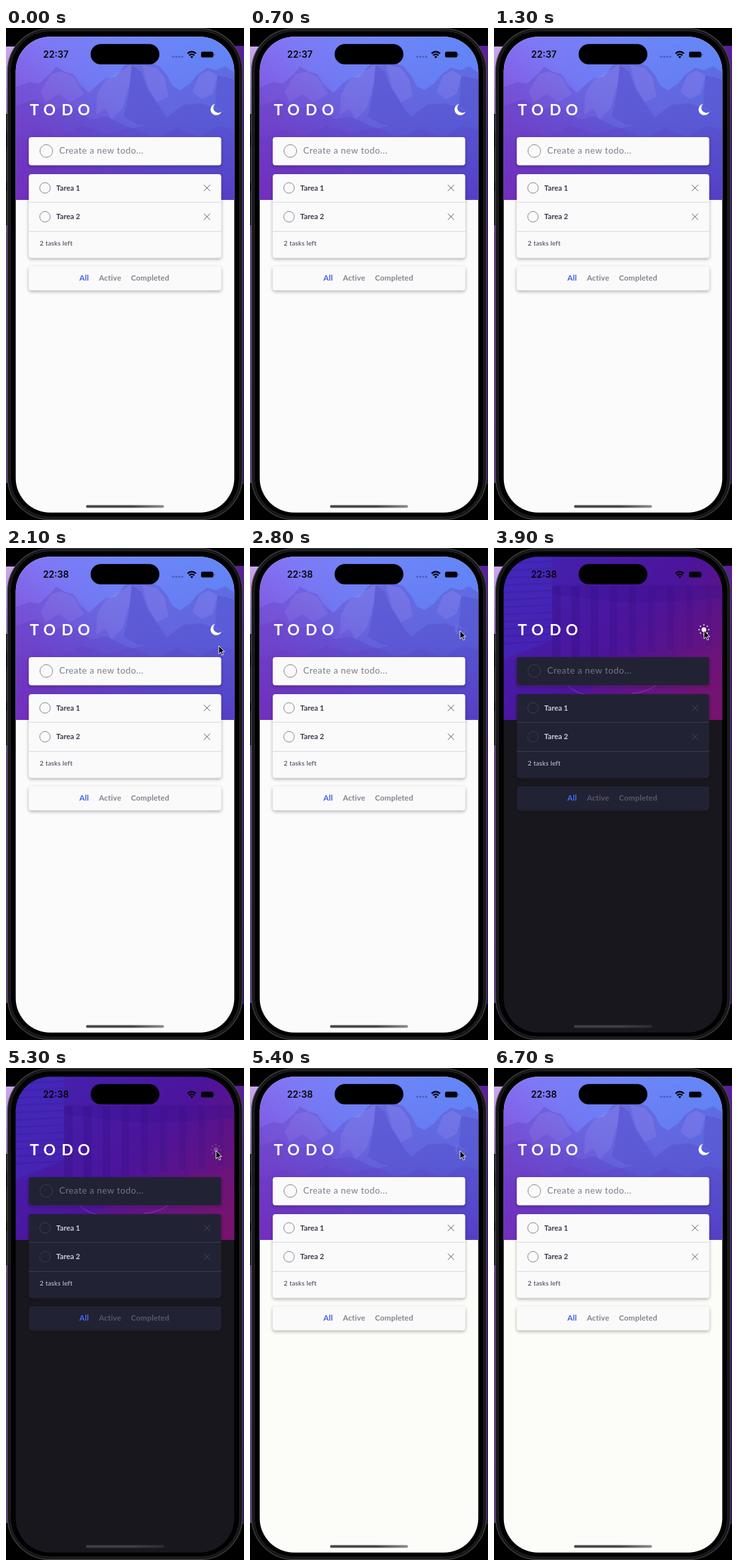
An HTML page for the animation above (8200 ms loop, 360 by 744 pixels).

```html
<!DOCTYPE html>
<html lang="en">
<head>
<meta charset="utf-8">
<title>Todo</title>
<style>
html, body { margin: 0; width: 100%; height: 100%; overflow: hidden; background: #000; }
svg { display: block; width: 100vw; height: 100vh; }
text { font-family: Lato, sans-serif; fill: var(--text); }
#app {
  --card: #fafafb; --text: #393a4f; --soft: #7c7d8a; --line: #d9d9de; --ring: #85868e;
  --cross: #5b5c66; --accent: #3d62dc; --tab: #84858f; --bar: #48484b; --barEnd: #8d8d90;
}
#app.dark {
  --card: #232136; --text: #cbcce2; --soft: #73758c; --line: #3a394e; --ring: #3c3b51;
  --cross: #454459; --accent: #3e70f2; --tab: #56566e; --bar: #3f3f47; --barEnd: #2c2c33;
}
.card { fill: var(--card); }
.line { stroke: var(--line); }
.ring { fill: none; stroke: var(--ring); }
.cross { fill: none; stroke: var(--cross); }
.tab { font-size: 11.7px; font-weight: 700; letter-spacing: .1px; fill: var(--tab); }
</style>
</head>
<body>
<svg viewBox="0 0 360 744" preserveAspectRatio="none">
  <defs>
    <clipPath id="screen"><rect x="14.7" y="13.3" width="330.6" height="719.4" rx="52"/></clipPath>
    <clipPath id="head"><rect x="14" y="13" width="332" height="247"/></clipPath>
    <linearGradient id="sky" x1="0" y1="0" x2="1" y2="0">
      <stop offset="0" stop-color="#8574f5"/><stop offset=".45" stop-color="#7184f8"/><stop offset="1" stop-color="#6288f8"/>
    </linearGradient>
    <linearGradient id="dusk" x1="0" y1="0" x2="0" y2="1">
      <stop offset="0" stop-color="#5b3ccc" stop-opacity="0"/><stop offset=".5" stop-color="#553cc8" stop-opacity=".2"/>
      <stop offset="1" stop-color="#5434bf" stop-opacity=".72"/>
    </linearGradient>
    <linearGradient id="warm" x1="0" y1="1" x2=".55" y2=".5">
      <stop offset="0" stop-color="#8424b8" stop-opacity=".6"/><stop offset="1" stop-color="#8424b8" stop-opacity="0"/>
    </linearGradient>
    <linearGradient id="night" x1="0" y1=".2" x2="1" y2=".9">
      <stop offset="0" stop-color="#4322b0"/><stop offset=".5" stop-color="#4c149b"/><stop offset="1" stop-color="#74136c"/>
    </linearGradient>
    <linearGradient id="leftEdge" x1="0" y1="0" x2="0" y2="1">
      <stop offset="0" stop-color="#cda6f0"/><stop offset=".12" stop-color="#a57cc9"/>
      <stop offset=".4" stop-color="#6a4585"/><stop offset="1" stop-color="#654181"/>
    </linearGradient>
    <linearGradient id="rightEdge" x1="0" y1="0" x2="0" y2="1">
      <stop offset="0" stop-color="#5b1f9c"/><stop offset=".2" stop-color="#40156f"/><stop offset="1" stop-color="#34105c"/>
    </linearGradient>
    <filter id="shadow" x="-10%" y="-20%" width="120%" height="150%">
      <feDropShadow dx="0" dy="2" stdDeviation="2.5" flood-color="#222" flood-opacity=".35"/>
    </filter>
  </defs>

  <rect width="360" height="744"/>
  <path fill="url(#leftEdge)" d="M0 28H30V688H0Z"/>
  <path fill="url(#rightEdge)" d="M330 27H360V690H330Z"/>
  <path fill="#09090b" d="M0 130H4V298H0Z"/>
  <path fill="#1b1b1e" d="M0 131H2V158H0ZM0 180H2V233H0ZM0 246H2V297H0Z"/>
  <rect x="2.5" y=".8" width="355" height="742.5" rx="64" fill="#161618" stroke="#47484b" stroke-width="1.2"/>
  <rect x="6.5" y="4.5" width="347" height="735" rx="60" fill="#000" stroke="#262729"/>

  <g id="app">
    <linearGradient id="bar">
      <stop offset="0" style="stop-color:var(--bar)"/><stop offset=".6" style="stop-color:var(--bar)"/>
      <stop offset="1" style="stop-color:var(--barEnd)"/>
    </linearGradient>
    <g clip-path="url(#screen)">
      <rect id="page" x="14" y="13" width="332" height="720"/>
      <g id="day" clip-path="url(#head)">
        <rect x="14" y="13" width="332" height="247" fill="url(#sky)"/>
        <path fill="#5b45c0" opacity=".36" d="M14 90L34 82 50 84 66 70 76 58 88 66 102 70 112 86 126 98 140 84 152 76 166 74 178 58 190 49 204 53 218 52 232 58 244 72 252 88 264 94 278 84 290 70 304 60 318 64 332 58 346 68V260H14Z"/>
        <g fill="#aaa0f4" opacity=".24">
          <path d="M68 70L84 66 102 73 118 100 96 112 80 100 60 112 52 96Z"/>
          <path d="M150 79L178 62 190 55 188 82 176 122 160 138 150 122 136 132 138 100Z"/>
          <path d="M206 56L228 60 240 76 246 104 228 112 214 88Z"/>
          <path d="M292 72L306 64 320 72 312 100 296 108 282 96Z"/>
        </g>
        <g fill="#4432ae" opacity=".22">
          <path d="M190 56L204 66 214 92 230 116 244 136 226 150 200 146 178 134 186 98Z"/>
          <path d="M14 118L44 108 70 124 96 116 128 138 152 134 190 152 232 144 268 116 296 114 346 132V260H14Z"/>
          <path d="M320 72L346 78V134L316 118Z"/>
        </g>
        <path fill="#4a36b4" opacity=".16" d="M14 168L52 154 82 164 116 148 154 160 188 150 226 166 258 152 294 165 322 148 346 154V260H14Z"/>
        <rect x="14" y="13" width="332" height="247" fill="url(#dusk)"/>
        <rect x="14" y="13" width="332" height="247" fill="url(#warm)"/>
      </g>
      <g id="nightScene" clip-path="url(#head)">
        <rect x="14" y="13" width="332" height="247" fill="url(#night)"/>
        <path fill="#4531c6" opacity=".4" d="M14 13H88V140L14 168Z"/>
        <path fill="#300c80" opacity=".2" d="M88 56H346V76L210 84 88 70Z"/>
        <g id="columns" fill="#2b0c78"></g>
        <path fill="#8c1679" opacity=".16" d="M90 260L190 178 346 150V260Z"/>
        <path fill="none" stroke="#9b5cae" opacity=".6" d="M111 207Q122 219 137 221M208 220Q232 218 246 207"/>
      </g>

      <text x="36 56.5 84 108.5" y="132" style="font-size:23px;font-weight:700;fill:#fff">TODO</text>

      <g filter="url(#shadow)">
        <rect class="card" x="34.5" y="165" width="291" height="42.5" rx="4"/>
        <rect class="card" x="34.5" y="221" width="291" height="126.5" rx="4"/>
        <rect class="card" x="34.5" y="360.5" width="291" height="36" rx="4"/>
      </g>
      <circle class="ring" cx="61" cy="186" r="9.6"/>
      <text x="80.5" y="190" style="font-size:13.4px;fill:var(--soft);letter-spacing:.5px">Create a new todo...</text>
      <g id="rows"></g>
      <path class="line" d="M34.5 263.5H325.5M34.5 307.5H325.5"/>
      <text x="51" y="328.5" style="font-size:10px;letter-spacing:.15px">2 tasks left</text>
      <text class="tab" x="111" y="382" style="fill:var(--accent)">All</text>
      <text class="tab" x="140.5" y="382">Active</text>
      <text class="tab" x="189" y="382">Completed</text>
      <rect x="121" y="721.5" width="118" height="4" rx="2" fill="url(#bar)"/>
    </g>

    <rect x="128" y="24.3" width="104" height="30.8" rx="15.4"/>
    <text id="clock" x="75.5" y="45" text-anchor="middle" style="font:600 13.8px Inter,sans-serif;fill:#050508"></text>
    <g id="dots" fill="#303a88" opacity=".55">
      <circle cx="253" cy="43.5" r="1.5"/><circle cx="257.5" cy="43.5" r="1.5"/>
      <circle cx="262" cy="43.5" r="1.5"/><circle cx="266.5" cy="43.5" r="1.5"/>
    </g>
    <g fill="none" stroke="#050508" stroke-width="2.3">
      <path d="M274.6 38.6Q281 32.8 287.4 38.6M277 41.5Q281 38 285 41.5"/>
      <path fill="#050508" stroke="none" d="M278.6 43.3Q281 41.5 283.4 43.3L281 45.9Z"/>
    </g>
    <rect x="295" y="35.8" width="18.6" height="8.8" rx="2.7" fill="#050508"/>
    <path d="M314.7 38.5Q316.4 40.2 314.7 41.9Z" fill="#050508"/>

    <g id="icon" fill="#fff">
      <path id="moon" d="M316.3 114.8A8.6 8.6 0 1 0 326 126.4A7.5 7.5 0 0 1 316.3 114.8Z"/>
      <g id="sun"><circle cx="317.5" cy="123.5" r="3.5"/><g id="rays"></g></g>
    </g>
  </g>
  <path id="cursor" d="M0 0V12.2L2.9 9.6 4.9 14.2 7 13.3 5 8.8H8.7Z" fill="#000" stroke="#fff" stroke-width=".9" stroke-linejoin="round"/>
</svg>
<script>
const LOOP = 8200, STEP = 100;
const get = id => document.getElementById(id);
const show = (id, on) => get(id).setAttribute('display', on ? 'inline' : 'none');
const clamp = v => Math.max(0, Math.min(1, v));
const mix = (a, b, k) => a + (b - a) * k;

get('rows').innerHTML = [241.8, 285.4].map((y, i) => `
  <circle class="ring" cx="59" cy="${y}" r="8"/>
  <text x="76" y="${y + 3.7}" style="font-size:11.2px;font-weight:700">Tarea ${i + 1}</text>
  <path class="cross" d="M299.3 ${y - 4.7}l9.4 9.4m0-9.4l-9.4 9.4"/>`).join('');

get('rays').innerHTML = Array.from({ length: 8 }, (_, i) =>
  `<circle cx="317.5" cy="116.2" r="1" transform="rotate(${i * 45} 317.5 123.5)"/>`).join('');

// Receding colonnade
let posts = '';
for (let i = 0; i < 9; i++) {
  const x = 88 + i * 29, w = 13 - i * .5;
  posts += `<path opacity="${.26 - i * .018}" d="M${x} 58h${w}V${172 - i * 3}h${-w}Z"/>`;
}
for (let y = 22; y < 145; y += 11) posts += `<path opacity=".16" d="M14 ${y}L88 ${y - 3}v2L14 ${y + 3}Z"/>`;
get('columns').innerHTML = posts;

// Touch feedback: dims on press, returns after release
function iconAlpha(t) {
  if (t >= 2800 && t < 2900) return .08;
  if (t >= 2900 && t < 3100) return mix(.42, 1, clamp((t - 2900) / 200));
  if (t >= 5300 && t < 5400) return .22;
  if (t >= 5400 && t < 5600) return mix(.06, 1, clamp((t - 5400) / 200));
  return 1;
}

function cursorAt(t) {
  if (t < 1500 || t >= 6700) return null;
  if (t >= 6600) return [327, 144];
  const k = 1 - (1 - clamp((t - 1500) / 1200)) ** 3;
  return [mix(351, 317.7, k), mix(308, 125, k)];
}

function draw(time) {
  const t = Math.floor(time % LOOP / STEP) * STEP;
  const dark = t >= 2900 && t < 5400;
  get('app').setAttribute('class', dark ? 'dark' : '');
  get('page').setAttribute('fill', dark ? '#17171d' : t < 5400 ? '#fbfbfb' : '#fcfdf8');
  show('day', !dark);
  show('nightScene', dark);
  show('dots', !dark);
  show('moon', !dark);
  show('sun', dark);
  get('icon').setAttribute('opacity', iconAlpha(t));
  get('clock').textContent = t < 2000 ? '22:37' : '22:38';
  const pos = cursorAt(t);
  show('cursor', pos);
  if (pos) get('cursor').setAttribute('transform', `translate(${pos})`);
}

const start = performance.now();
function tick() {
  draw(performance.now() - start);
  requestAnimationFrame(tick);
}
draw(0);
requestAnimationFrame(tick);
</script>
</body>
</html>
```
